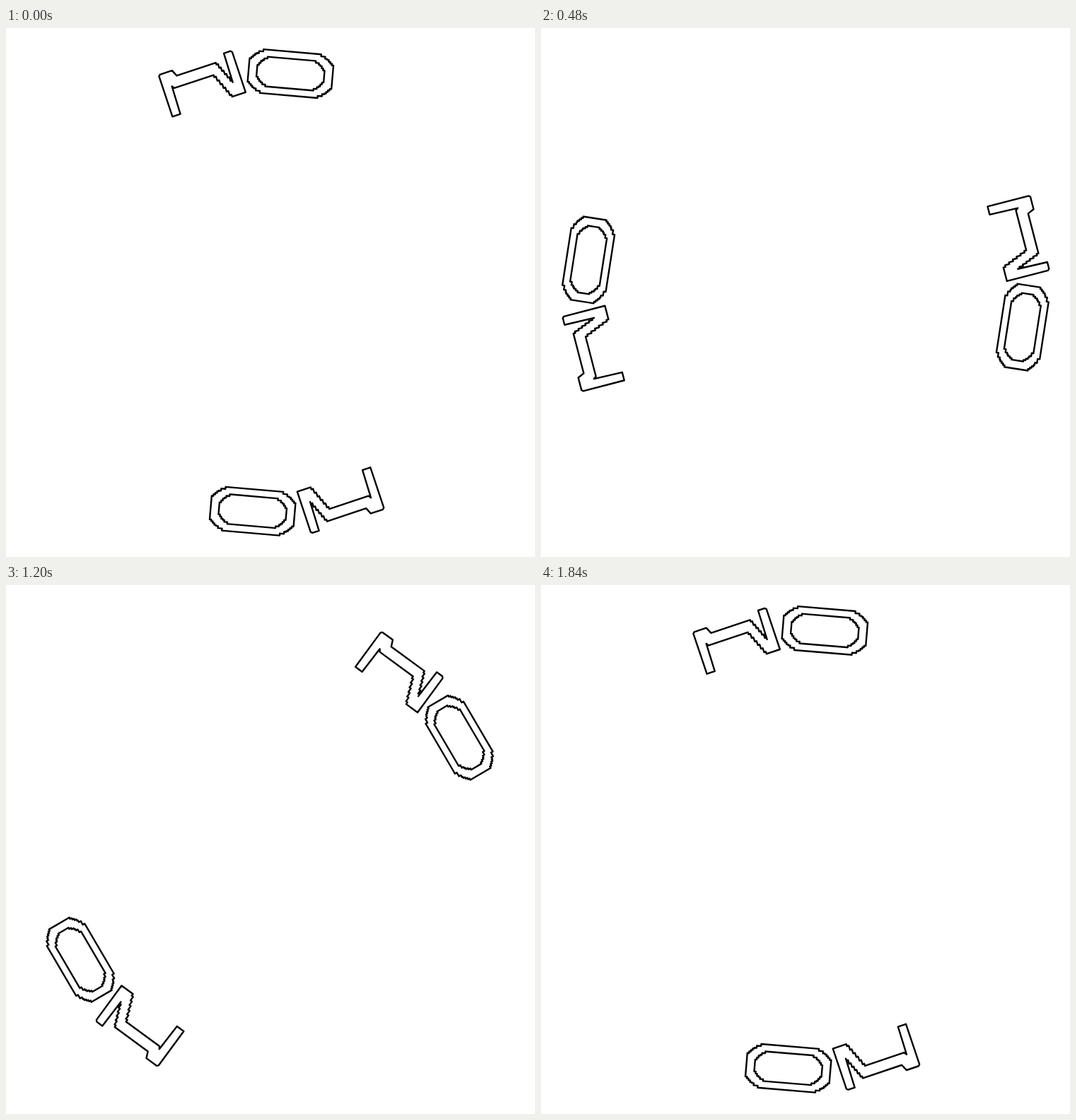
An HTML page with a canvas for the animation above (1.92 s loop, 748 px wide and 748 px high).

```html
<!DOCTYPE html>
<html lang="en">
<head>
<meta charset="utf-8">
<title>Rotating outlines</title>
<style>
  html, body { margin: 0; width: 100%; height: 100%; overflow: hidden; background: #fff; }
  canvas { display: block; }
</style>
</head>
<body>
<canvas id="stage" width="748" height="748"></canvas>
<script>
const ctx = document.getElementById("stage").getContext("2d");
const SIZE = 748, LOOP = 1920, STEP = 80, COUNT = LOOP / STEP;
const TURN = 6.28 / (COUNT - 1); // both ends of the turn are shown
const RADIUS = 310.5;
const HALF = 31;  // half the height of a glyph
const CELL = 2.5; // size of the stairs on slanted edges
const rad = deg => deg * Math.PI / 180;

// Oblong with cut, slightly bulging corners
function oblong(w, h, cutX, cutY) {
  const corner = [0, 0.5, 1].map(t => {
    const bulge = Math.sin(Math.PI * t);
    return [w - cutX * (1 - t) + 1.2 * bulge, h - cutY * t + 1.8 * bulge];
  });
  const back = corner.slice().reverse();
  const flip = (pts, sx, sy) => pts.map(([x, y]) => [x * sx, y * sy]);
  return [
    ...flip(corner, 1, -1), ...flip(back, 1, 1),
    ...flip(corner, -1, 1), ...flip(back, -1, -1)
  ];
}

// Left stem, bar, slanted stroke and right stem in one bent line
function bent(w, pen, foot) {
  const left = pen - w, right = w - pen;
  const top = 9 - HALF, under = top + 15.6;
  const cut = 2, notch = 3.5;
  return [
    [-w, HALF], [-w, cut - HALF], [cut - w, -HALF], [foot - w, -HALF],
    [foot - w + 4, top], [right - 15, top], [right - 1, pen],
    [right, -HALF], [w - cut, -HALF], [w, cut - HALF], [w, HALF],
    [w - foot, HALF], [w - foot - 15.3, under],
    [left + notch, under], [left + 1, under - notch], [left, HALF]
  ];
}

// Slanted edges become small stairs, the others stay straight
function addEdge(path, [x, y], [x2, y2]) {
  const dx = x2 - x, dy = y2 - y;
  const small = Math.min(Math.abs(dx), Math.abs(dy));
  if (small > 4) {
    const n = Math.round(small / CELL);
    const wide = Math.abs(dx) > Math.abs(dy);
    for (let i = 0; i < n; i++) {
      const mid = (i + 0.5) / n, a = i / n, b = (i + 1) / n;
      path.lineTo(x + dx * (wide ? mid : a), y + dy * (wide ? a : mid));
      path.lineTo(x + dx * (wide ? mid : b), y + dy * (wide ? b : mid));
    }
  }
  path.lineTo(x2, y2);
}

function outline(...shapes) {
  const path = new Path2D();
  for (const pts of shapes) {
    path.moveTo(...pts[0]);
    pts.forEach((p, i) => addEdge(path, p, pts[(i + 1) % pts.length]));
    path.closePath();
  }
  return path;
}

// Each glyph pair turns about its own point, just beside the centre
const glyphs = [
  { path: outline(bent(54.5, 11.8, 20)), angle: rad(-18.4), x: 1.3, y: -0.7 },
  {
    path: outline(oblong(59.5, HALF, 21.5, 15.5), oblong(47.7, 21, 15.7, 14)),
    angle: rad(4.95), x: 1.5, y: -0.1
  }
];

function draw(step) {
  ctx.fillStyle = "#fff";
  ctx.fillRect(0, 0, SIZE, SIZE);
  ctx.strokeStyle = "#000";
  ctx.lineWidth = 2.4;
  ctx.lineJoin = "round";
  for (const { path, angle, x, y } of glyphs) {
    for (const half of [0, Math.PI]) {
      ctx.save();
      ctx.translate(SIZE / 2, SIZE / 2);
      ctx.rotate(step * TURN);
      ctx.translate(x, y);
      ctx.rotate(half + angle);
      ctx.translate(0, -RADIUS);
      ctx.stroke(path);
      ctx.restore();
    }
  }
}

const start = performance.now();
function tick(now) {
  const t = Math.max(0, now - start) % LOOP;
  draw(Math.floor(t / STEP));
  requestAnimationFrame(tick);
}
draw(0);
requestAnimationFrame(tick);
</script>
</body>
</html>
```
